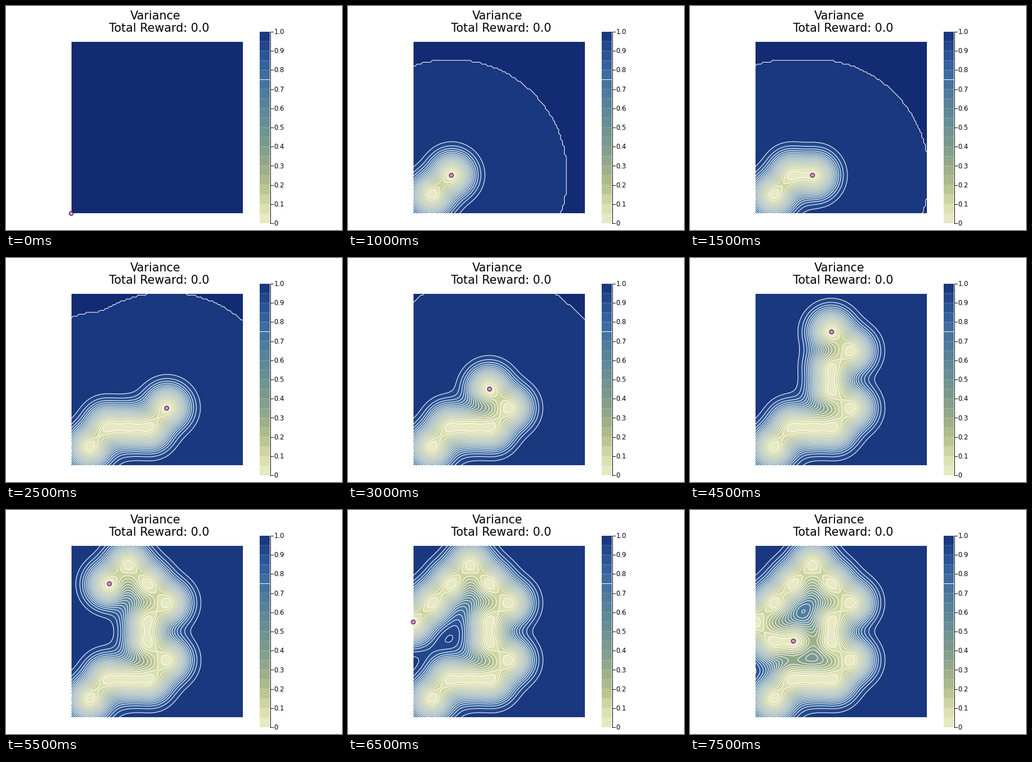
Write a matplotlib script that moves like this. It is 600 px wide and 400 px high and loops after 8 s.

```python
import numpy as np
import matplotlib.pyplot as plt
from matplotlib.animation import FuncAnimation
from matplotlib.colors import LinearSegmentedColormap
from matplotlib.patches import Circle, Rectangle

W, H, DPI = 600, 400, 100
PX = 72 / DPI                      # points per pixel
X0, Y0, CELL, N = 116.4, 370.5, 34.1, 9
NOISE = 0.01

NAVY = "#132b73"
ANCHORS = [
    (0.00, "#ebedca"), (0.10, "#d8dca8"), (0.18, "#b9c48f"),
    (0.28, "#9caf89"), (0.40, "#7e9b8d"), (0.50, "#6b9193"),
    (0.60, "#5c8699"), (0.70, "#4a789e"), (0.80, "#3a68a0"),
    (0.90, "#274f94"), (1.00, "#163179"),
]
LEVELS = np.linspace(0, 1, 21)
BANDS = LinearSegmentedColormap.from_list("bands", ANCHORS)(LEVELS[:-1] + 0.025)

# Agent position at every step, in grid cells
PATH = np.array([
    (0, 0), (1, 1), (2, 2), (3, 2), (4, 2), (5, 3), (4, 4), (4, 5),
    (5, 6), (4, 7), (3, 8), (2, 7), (1, 6), (0, 5), (1, 4), (2, 4),
], float)

axis = np.linspace(0, N, 10 * N + 1)
GX, GY = np.meshgrid(axis, axis)
GRID = np.column_stack([GX.ravel(), GY.ravel()])
# Below this the explained variance vanishes in floating point
FLOOR = np.exp(-37.01)


def to_px(x, y):
    return X0 + CELL * x, Y0 - CELL * y


def kernel(a, b):
    d2 = ((a[:, None] - b[None]) ** 2).sum(-1)
    return np.exp(-d2 / 2)


def explained(points):
    """Variance removed by the measurements of a Gaussian process."""
    cov = kernel(points, points) + NOISE * np.eye(len(points))
    v = np.linalg.solve(np.linalg.cholesky(cov), kernel(points, GRID))
    return (v ** 2).sum(0).reshape(GX.shape)


fig = plt.figure(figsize=(W / DPI, H / DPI), dpi=DPI, facecolor="white")
ax = fig.add_axes([0, 0, 1, 1])
ax.set_xlim(0, W)
ax.set_ylim(H, 0)
ax.axis("off")


def label(x, y, text, size, ha):
    ax.text(x, y, text, fontsize=size * PX, ha=ha, va="baseline",
            family="DejaVu Sans", color="black")


def draw_colorbar(x0=453, x1=471, top=46, height=342):
    base = top + height
    step = height / len(BANDS)
    for i, color in enumerate(BANDS):
        y = base - (i + 1) * step
        ax.add_patch(Rectangle((x0, y), x1 - x0, step, fc=color, lw=0,
                               antialiased=False))
    for i in range(1, len(BANDS)):
        y = base - i * step
        ax.plot([x0, x1], [y, y], color="white", alpha=0.25, lw=0.8 * PX,
                snap=False, solid_capstyle="butt")
    ax.plot([x1 + 0.5] * 2, [top, base], color="black", lw=PX)
    for i in range(11):
        y = base - height * i / 10
        ax.plot([x1 + 0.5, x1 + 6], [y, y], color="black", lw=PX)
        label(x1 + 7.3, y + 4.1, f"{i / 10:.1f}" if i else "0", 11.8, "left")


label(266.5, 23.5, "Variance", 20.75, "center")
label(273.4, 46.3, "Total Reward: 0.0", 20.75, "center")
draw_colorbar()

frame_box = Rectangle((117, 64), 306, 306, fc=NAVY, lw=0,
                      antialiased=False, zorder=1)
ax.add_patch(frame_box)
dot = Circle(to_px(0, 0), 3.6, fc="#ff83fa", ec="black", lw=PX, zorder=5)
ax.add_patch(dot)

PXX, PXY = to_px(GX, GY)
layers = []


def add_layer(layer):
    layer.set_clip_path(frame_box)
    layers.append(layer)


def update(step):
    while layers:
        layers.pop().remove()
    dot.center = to_px(*PATH[step])
    if step:
        gain = explained(PATH[1:step + 1])
        var = np.clip(1 - gain, 0, 1)
        known = (gain >= FLOOR).astype(float)
        line = dict(colors="white", linewidths=1.1 * PX)
        add_layer(ax.contourf(PXX, PXY, var, LEVELS, colors=BANDS, zorder=2))
        if known.min() == 0:
            add_layer(ax.contourf(PXX, PXY, known, [-1, 0.8], colors=[NAVY], zorder=3))
            add_layer(ax.contour(PXX, PXY, known, [0.8], zorder=4, **line))
        add_layer(ax.contour(PXX, PXY, var, LEVELS[1:-1], zorder=4, **line))
    ax.set_xlim(0, W)
    ax.set_ylim(H, 0)
    return [dot]


anim = FuncAnimation(fig, update, frames=len(PATH), interval=500,
                     repeat=True, repeat_delay=0, blit=False)
plt.show()
```
